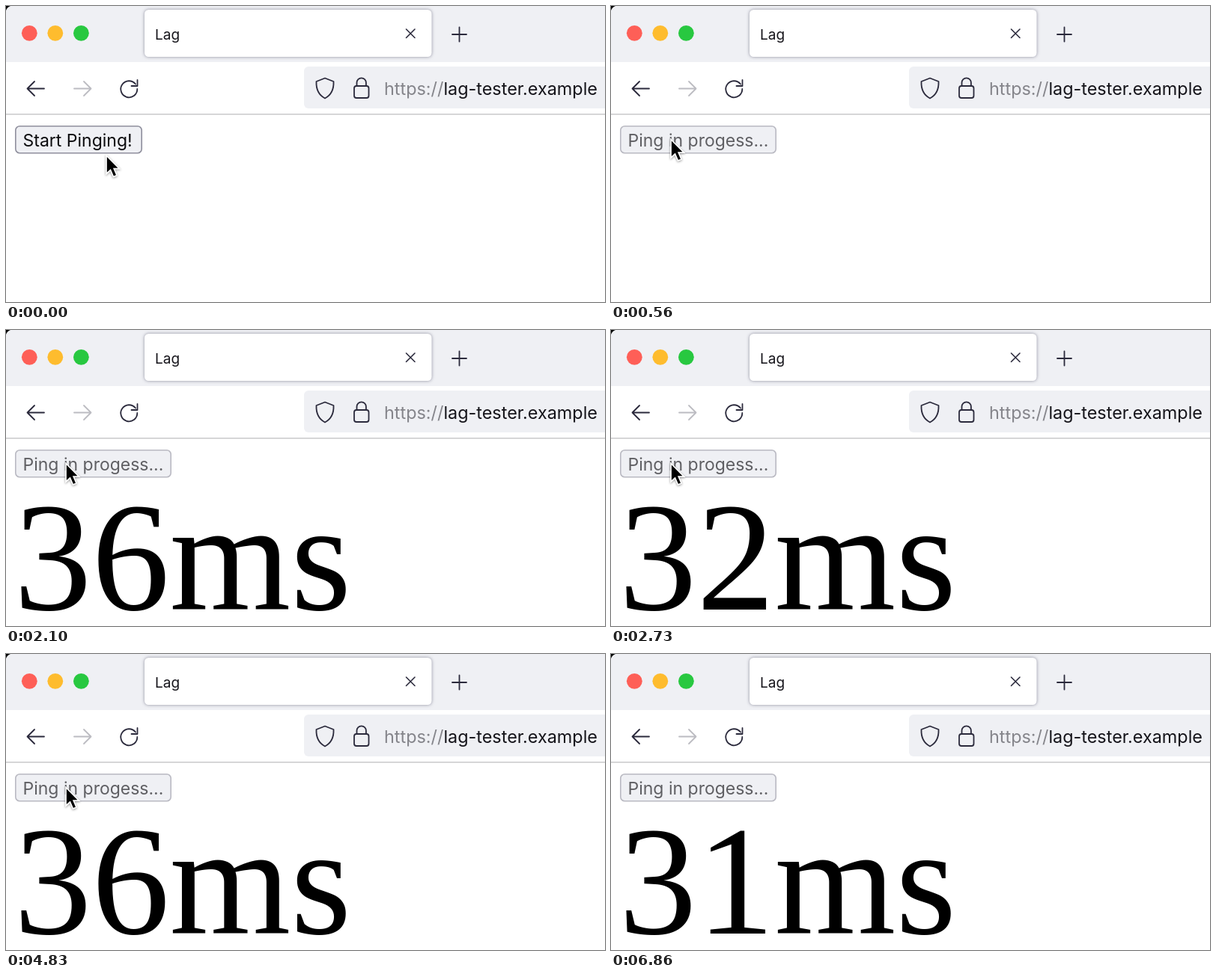
An HTML page for the animation above (7000 ms loop, 800x396 px).

```html
<!DOCTYPE html>
<html lang="en">
<head>
<meta charset="utf-8">
<title>Ping</title>
<style>
html, body { margin: 0; width: 100%; height: 100%; overflow: hidden; background: #fff; }
svg { display: block; width: 800px; height: 396px; }
text { font-family: Inter, "Open Sans", sans-serif; font-size: 23px; white-space: pre; }
.icon { fill: none; stroke: #2b2a3c; stroke-width: 1.8; stroke-linecap: round; stroke-linejoin: round; }
.thin { stroke-width: 1.6; }
#title { font-size: 19px; }
#address { font-size: 23.4px; }
#tab { filter: drop-shadow(0 0 2px rgba(60, 60, 85, .55)); }
#result { font-family: "Liberation Serif", "Times New Roman", serif; font-size: 208px; }
#cursor { filter: drop-shadow(0 1px 1.5px rgba(0, 0, 0, .4)); }
</style>
</head>
<body>
<svg viewBox="0 0 800 396">
  <rect width="800" height="75" fill="#eff0f4"/>
  <path d="M0 0H6Q1.500 1.500 0 6Z"/>
  <circle cx="31.3" cy="36.3" r="10.4" fill="#fe5f57"/>
  <circle cx="65.8" cy="36.3" r="10.4" fill="#febc2e"/>
  <circle cx="100.4" cy="36.3" r="10.4" fill="#28c840"/>
  <rect id="tab" x="185" y="5" width="383.5" height="63" rx="5.5" fill="#fff"/>
  <text id="title" x="199" y="45" fill="#15141a">Lag</text>
  <path class="icon thin" d="M534.5 31l11.5 11.5M546 31l-11.5 11.5"/>
  <path class="icon" d="M596 38h19M605.5 28.5v19"/>

  <path class="icon" d="M51 110.5H28.5M38 101l-9.5 9.5 9.5 9.5"/>
  <path class="icon" style="stroke:#bcbcc2" d="M91 110.5h22.5M104 101l9.5 9.5-9.5 9.5"/>
  <path class="icon" d="M173 104.5A11 11 0 1 0 175.3 111M175.5 99v8h-8"/>
  <rect x="398" y="81" width="410" height="56" rx="6" fill="#eff0f4"/>
  <path class="icon" d="M426 96.5L437.5 101C438 112 434.5 119 426 123.5 417.5 119 414 112 414.5 101Z"/>
  <rect class="icon" x="465" y="107" width="19.5" height="16" rx="3"/>
  <path class="icon" d="M468.5 107v-4.5a6.2 6.2 0 0 1 12.4 0v4.5"/>
  <text id="address" x="505" y="119" fill="#85858b">https://<tspan fill="#15141a">lag-tester.example</tspan></text>
  <rect y="144" width="800" height="1.6" fill="#ccccce"/>

  <rect id="button" x="12.8" y="160.8" height="36" rx="5.5" fill="#eff0f4" stroke-width="1.6"/>
  <text id="label" x="22.5" y="187.5"></text>
  <text id="result" x="10.5" y="374"></text>
  <path id="cursor" d="M0 0V24.5L5.5 19.5 9.5 28.5 14 26.5 10.2 17.7H17.5Z" stroke="#fff" stroke-width="1.7"/>
</svg>
<script>
const LOOP = 7000, STEP = 70;
const CLICK = 490, HIDE = 6230;
const FROM = [134, 200], TO = [80, 178.5];
const MOVE = [70, 420];
// One reply arrives about every second.
const FIRST = 1680, PERIOD = 1050;
const PINGS = [36, 32, 34, 36, 31];

const el = id => document.getElementById(id);
const [button, label, result, cursor] = ["button", "label", "result", "cursor"].map(el);

function setAttrs(node, attrs) {
  for (const key in attrs) node.setAttribute(key, attrs[key]);
}

function drawButton(busy) {
  setAttrs(button, {
    width: busy ? 207.4 : 168.4,
    stroke: busy ? "#b9b9c2" : "#8f8f9d"
  });
  label.textContent = busy ? "Ping in progess..." : "Start Pinging!";
  label.setAttribute("fill", busy ? "#5f5f63" : "#0c0c0e");
}

function drawCursor(t) {
  const p = Math.min(1, Math.max(0, (t - MOVE[0]) / (MOVE[1] - MOVE[0])));
  const ease = p * p * (3 - 2 * p);
  const [x, y] = FROM.map((v, i) => v + (TO[i] - v) * ease);
  setAttrs(cursor, {
    transform: `translate(${x} ${y})`,
    visibility: t < HIDE ? "visible" : "hidden"
  });
}

function draw(t) {
  drawButton(t >= CLICK);
  drawCursor(t);
  const ping = PINGS[Math.floor((t - FIRST) / PERIOD)];
  result.textContent = ping ? ping + "ms" : "";
}

const start = performance.now();
function tick() {
  const t = (performance.now() - start) % LOOP;
  draw(Math.floor(t / STEP) * STEP);
  requestAnimationFrame(tick);
}
draw(0);
requestAnimationFrame(tick);
</script>
</body>
</html>
```
